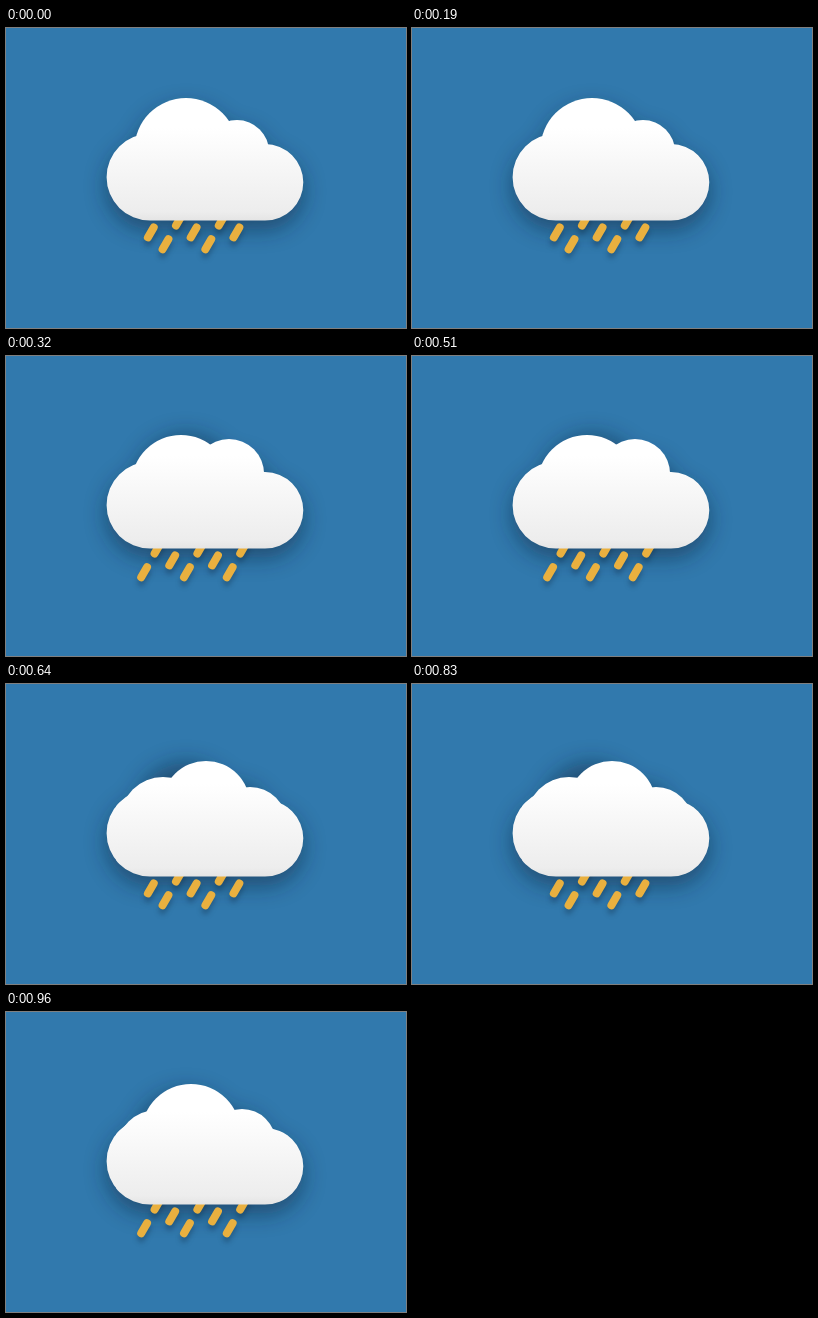
Animation, 400 px wide and 300 px high, one loop 1.28 s. Source, as an HTML page:

```html
<!DOCTYPE html>
<html lang="en">
<head>
<meta charset="utf-8">
<title>Rain cloud</title>
<style>
  html, body { margin: 0; width: 100%; height: 100%; overflow: hidden; background: #3179ad; }
  svg { display: block; width: 100%; height: 100%; }
</style>
</head>
<body>
<svg viewBox="0 0 400 300">
  <defs>
    <path id="base" d="M144 105.8a43.4 43.4 0 0 0 0 86.8H259a38.3 38.3 0 0 0 0-76.6Z"/>
    <linearGradient id="shade" gradientUnits="userSpaceOnUse" x1="0" y1="100" x2="0" y2="193">
      <stop offset="0" stop-color="#fff"/>
      <stop offset=".9" stop-color="#ededed"/>
      <stop offset="1" stop-color="#e4e4e4"/>
    </linearGradient>
    <filter id="blur" filterUnits="userSpaceOnUse" x="0" y="0" width="400" height="300">
      <feGaussianBlur stdDeviation="11"/>
    </filter>
    <filter id="dropShadow" filterUnits="userSpaceOnUse" x="100" y="160" width="200" height="100" color-interpolation-filters="sRGB">
      <feDropShadow dx="0" dy="5" stdDeviation="2.5" flood-color="#0b2238" flood-opacity=".3"/>
    </filter>
  </defs>
  <!-- The soft shadow stays still while the cloud changes above it. -->
  <g transform="translate(0 9)" fill="#0b2238" opacity=".5" filter="url(#blur)">
    <use href="#base"/>
    <g id="shadowPuffs"></g>
  </g>
  <path id="rain" fill="none" stroke="#e9b03f" stroke-width="8" stroke-linecap="round" filter="url(#dropShadow)"/>
  <g fill="url(#shade)">
    <use href="#base"/>
    <g id="puffs"></g>
  </g>
</svg>
<script>
  const STEP = 320;
  const POSES = 4;
  const PEAK_X = 180;

  // The path [x, top] every puff follows from right to left, one point per step.
  const track = [
    [244, 103], [236, 97], [231, 92], [223, 83], [200, 77],
    [185, 72], [180, 70], [175, 79], [157, 93], [151, 98]
  ];

  const rain = { left: 130.1, top: 192.6, spacing: 42.8, rowShift: 14.7, rowHeight: 11.8, rows: 3 };

  const byId = id => document.getElementById(id);

  // Puffs are largest at the peak and swell a little again at the far right.
  const radius = x => 32 + Math.abs(19.5 - 0.38 * Math.abs(x - PEAK_X));

  function puff([x, top]) {
    const r = radius(x);
    return `<circle cx="${x}" cy="${top + r}" r="${r}"/>`;
  }

  // Successive puffs are one whole loop apart on the track.
  const puffsAt = pose =>
    track.filter((_, i) => (i + 2 - pose) % POSES === 0).map(puff).join('');

  const drop = (x, y) => `M${x + 2.9} ${y - 5}l-5.8 10`;

  // A slanted lattice of drops that shifts by half its spacing on every step.
  function rainAt(pose) {
    const { left, top, spacing, rowShift, rowHeight, rows } = rain;
    let path = '';
    for (let row = 0; row < rows; row++) {
      for (let i = -1; i < 4; i++) {
        const x = left + row * rowShift + (i + (pose % 2) / 2) * spacing;
        if (x > 135 && x < 240) path += drop(x, top + row * rowHeight);
      }
    }
    return path;
  }

  let shown = -1;

  function render(time) {
    const pose = Math.floor(time / STEP) % POSES;
    if (pose === shown) return;
    shown = pose;
    byId('puffs').innerHTML = puffsAt(pose);
    byId('rain').setAttribute('d', rainAt(pose));
  }

  byId('shadowPuffs').innerHTML = puffsAt(0);

  const start = performance.now();
  function tick() {
    render(performance.now() - start);
    requestAnimationFrame(tick);
  }
  tick();
</script>
</body>
</html>
```
